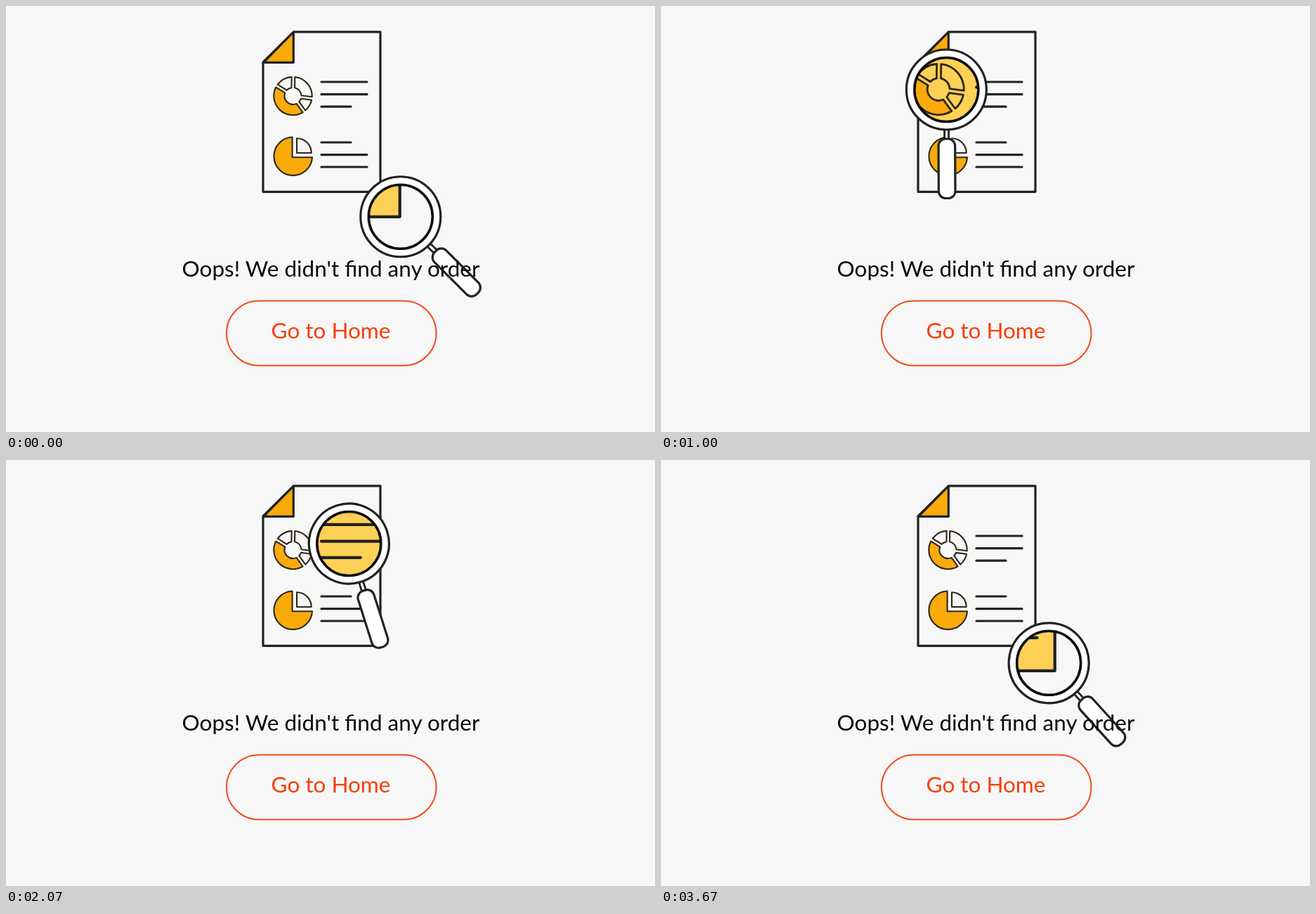
Write an HTML page that moves like this. It is 924 px wide and 606 px high and loops after 3.74 s.

```html
<!DOCTYPE html>
<html lang="en">
<head>
<meta charset="utf-8">
<title>No orders</title>
<style>
  html, body { margin: 0; width: 100%; height: 100%; overflow: hidden; background: #f7f7f7; }
  svg { display: block; width: 924px; height: 606px; --paper: #f7f7f7; }
  text { font: 31.5px Lato, "Open Sans", sans-serif; text-anchor: middle; }
  .ink { stroke: #222; stroke-width: 3.2; stroke-linecap: round; stroke-linejoin: round; }
  .chart { stroke: #2e2718; stroke-width: 2.1; stroke-linejoin: round; fill: none; }
  .chart .hot, .fold { fill: #faab0a; }
  .zoom { --paper: #fdd056; }
</style>
</head>
<body>
<svg viewBox="0 0 924 606">
  <defs>
    <clipPath id="glass"><circle id="hole" r="45.5"/></clipPath>
    <g id="page">
      <path class="ink" fill="var(--paper)" d="M366 80V264.3H533V36.8H409.5Z"/>
      <path class="ink fold" d="M366.5 80.3H409.3V37Z"/>
      <g id="donut" class="chart" transform="translate(408.5 128)"/>
      <g class="chart">
        <path class="hot" d="M407.6 186.5A27.3 27.3 0 1 0 436 215.3H407.6Z"/>
        <path d="M414 188.3V209H434.7A20.7 20.7 0 0 0 414 188.3Z"/>
      </g>
      <path class="ink" fill="none" d="M449 108H514M449 125.7H514M449 143.2H491M449 194H491M449 211.6H514M449 229H514"/>
    </g>
  </defs>

  <use href="#page"/>

  <g id="tool" class="ink" fill="#fff">
    <path d="M-3 56V72H3V56" stroke-width="2.8"/>
    <rect x="-11.6" y="70" width="23.6" height="84.5" rx="10"/>
    <circle r="57"/>
    <circle r="45.5" fill="#f7f7f7" stroke="none"/>
  </g>
  <g clip-path="url(#glass)">
    <use class="zoom" href="#page" transform="translate(449 156.5) scale(1.33) translate(-449 -156.5)"/>
  </g>
  <circle id="rim" r="45.5" fill="none" stroke="#0c0c0c" stroke-width="3.6"/>

  <text x="462.5" y="385" fill="#0a0a0a">Oops! We didn't find any order</text>
  <rect x="314" y="419.5" width="298.5" height="92" rx="46" fill="none" stroke="#f24a18" stroke-width="2"/>
  <text x="462.5" y="473" fill="#f93c07">Go to Home</text>
</svg>
<script>
const el = id => document.getElementById(id);

// Donut segments, split by parallel gaps at the given angles
const cuts = [54, 212, 271, 367.5, 414], outer = 27.2, inner = 12, gap = 2.3;
const point = (r, deg, side) => {
  const a = deg * Math.PI / 180 + side * Math.asin(gap / r);
  return (r * Math.cos(a)).toFixed(2) + " " + (r * Math.sin(a)).toFixed(2);
};
el("donut").innerHTML = cuts.slice(1).map((end, i) => {
  const start = cuts[i];
  return `<path class="${i ? "" : "hot"}" d="M${point(outer, start, 1)}` +
    `A${outer} ${outer} 0 0 1 ${point(outer, end, -1)}L${point(inner, end, -1)}` +
    `A${inner} ${inner} 0 0 0 ${point(inner, start, 1)}Z"/>`;
}).join("");

// Same curve as the CSS "ease" timing function
function ease(x) {
  let lo = 0, hi = 1, s = 0.5;
  for (let i = 0; i < 24; i++) {
    s = (lo + hi) / 2;
    if (0.75 * s * (1 - s) + s ** 3 < x) lo = s; else hi = s;
  }
  return 0.3 * s * (1 - s) ** 2 + 3 * (1 - s) * s * s + s ** 3;
}

const LOOP = 3740, CYCLE = 3584, DELAY = 15, STEP = 200 / 3;
// Share of the cycle, then x, y and tilt of the magnifier
const stops = [
  [0, 561.8, 299.8, 45],
  [0.25, 403.3, 119, -0.4],
  [0.75, 496.4, 119, 19.3],
  [1, 561.8, 299.8, 45]
];

function pose(t) {
  const p = (t - DELAY + CYCLE) % CYCLE / CYCLE;
  const i = stops.findIndex(s => p < s[0]);
  const a = stops[i - 1], b = stops[i];
  const k = ease((p - a[0]) / (b[0] - a[0]));
  return a.slice(1).map((v, j) => v + (b[j + 1] - v) * k);
}

const begin = performance.now();
function draw() {
  const t = (performance.now() - begin) % LOOP;
  const [x, y, tilt] = pose(Math.floor((t + 4) / STEP) * STEP);
  const move = `translate(${x} ${y})`;
  el("tool").setAttribute("transform", `${move} rotate(${-tilt})`);
  el("rim").setAttribute("transform", move);
  el("hole").setAttribute("transform", move);
  requestAnimationFrame(draw);
}
draw();
</script>
</body>
</html>
```
